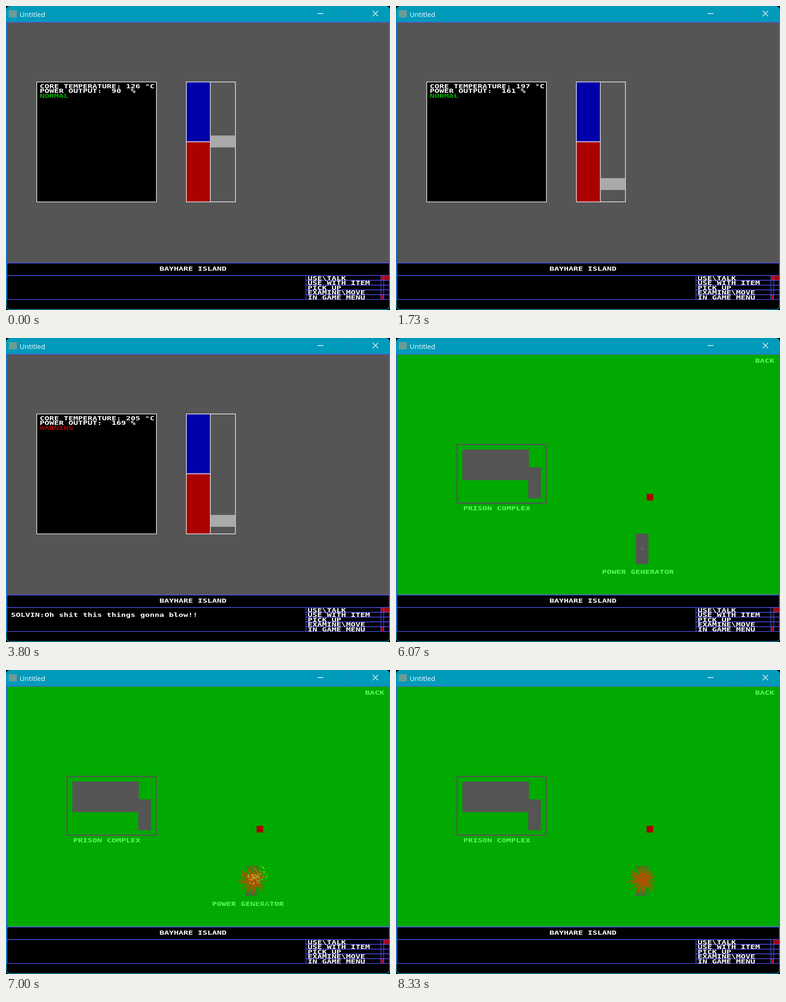
Recreate the animation shown at these times as an HTML page with a canvas. Size 842 px wide and 665 px high, loop 9270 ms.

```html
<!DOCTYPE html>
<html lang="en">
<head>
<meta charset="utf-8">
<title>Untitled</title>
<style>
  html, body { margin: 0; width: 100%; height: 100%; overflow: hidden; background: #000; }
  canvas { display: block; }
</style>
</head>
<body>
<canvas id="stage" width="842" height="665"></canvas>
<script>
const ctx = document.getElementById('stage').getContext('2d');
const LOOP = 9270, TICK = 200 / 3;
const PX = 1.3125;                 // one game pixel on the stage
const GRAY = '#555555', BLUE = '#5555ff', GREEN = '#00aa00', RED = '#aa0000',
      BROWN = '#aa5500', LIME = '#55ff55', YELLOW = '#ffff55', WHITE = '#ffffff',
      TEAL = '#009abb';
const CORE = { x: 540, y: 460.5 };
const MENU = ['USE\\TALK', 'USE WITH ITEM', 'PICK UP', 'EXAMINE\\MOVE', 'IN GAME MENU'];
// [tick, core temperature]
const HEAT = [[0, 126], [3, 126], [18, 174], [27, 200], [30, 202], [31, 202], [33, 205], [139, 205]];

let seed = 7;
const rand = () => (seed = (seed * 16807) % 2147483647) / 2147483647;
const make = (n, f) => Array.from({ length: n }, f);
const ray = (min, max) => ({ angle: rand() * Math.PI * 2, length: min + rand() * (max - min) });

const craters = make(150, () => ray(26, 40));
const flames = make(125, () => ray(13, 34));
const sparks = make(85, () => {
  const speed = 11.3 * rand() ** 1.3;
  return {
    x: (rand() - 0.5) * 24, y: (rand() - 0.5) * 24,
    vx: speed * (0.25 + 0.75 * rand()), vy: -speed * (0.25 + 0.75 * rand()),
    color: rand() < 0.75 ? YELLOW : LIME,
    end: 119 + Math.floor(rand() * 7)
  };
});
const chips = make(26, () => ({ x: 543 + rand() * 33, y: 505 + rand() * 11 }));

function rect(color, x, y, w, h) {
  ctx.fillStyle = color;
  ctx.fillRect(x, y, w, h);
}

function frame(color, x, y, w, h, width = PX) {
  ctx.strokeStyle = color;
  ctx.lineWidth = width;
  ctx.strokeRect(x, y, w, h);
}

function path(color, width, ...points) {
  ctx.strokeStyle = color;
  ctx.lineWidth = width;
  ctx.beginPath();
  for (let i = 0; i < points.length; i += 4) {
    ctx.moveTo(points[i], points[i + 1]);
    ctx.lineTo(points[i + 2], points[i + 3]);
  }
  ctx.stroke();
}

// Wide console lettering: square cells of 8 by 8 game pixels
function print(text, x, baseline, color = WHITE) {
  ctx.save();
  ctx.translate(x, baseline);
  ctx.scale(1.384, 1);
  ctx.font = 'bold 12.6px "DejaVu Sans Mono", monospace';
  ctx.fillStyle = color;
  ctx.fillText(text, 0, 0);
  ctx.restore();
}

function dot(color, x, y) {
  rect(color, Math.round(x / PX) * PX, Math.round(y / PX) * PX, PX, PX);
}

function burst(rays, color, grow) {
  for (const { angle, length } of rays)
    for (let d = 0; d < length * grow; d++)
      dot(color, CORE.x + d * Math.cos(angle), CORE.y + d * Math.sin(angle));
}

function heatAt(k) {
  const i = HEAT.findIndex(([tick]) => tick > k);
  const [k0, v0] = HEAT[i - 1], [k1, v1] = HEAT[i];
  return Math.round(v0 + (v1 - v0) * (k - k0) / (k1 - k0));
}

function drawWindow() {
  ctx.clearRect(0, 0, 842, 665);
  ctx.fillStyle = TEAL;
  ctx.beginPath();
  ctx.roundRect(0, 0, 842, 665, 9);
  ctx.fill();
  ctx.fillStyle = '#000';
  ctx.beginPath();
  ctx.roundRect(1.5, 35, 839, 628.5, [0, 0, 8, 8]);
  ctx.fill();

  rect('#6b9c94', 6, 9, 18, 16);
  ctx.font = '15px "Open Sans", sans-serif';
  ctx.fillStyle = WHITE;
  ctx.fillText('Untitled', 30, 24);
  path(WHITE, 1.3, 683, 16.5, 696, 16.5, 804, 10.5, 816, 22.5, 816, 10.5, 804, 22.5);
  frame('#1987bb', 743.5, 10.5, 11.5, 11.5, 1);
}

function drawStatus(onMap) {
  frame(BLUE, 2.2, 562.2, 838.3, 27.3);
  frame(BLUE, 2.2, 589.5, 838.3, 52.5);
  rect(RED, onMap ? 829 : 822, 590, onMap ? 11 : 18, 10);
  rect(RED, 822, 632, 6, 10);
  for (let i = 1; i < 5; i++) path(BLUE, PX, 658, 589.5 + i * 10.5, 840, 589.5 + i * 10.5);
  for (const x of [657.8, 822, 828.3]) path(BLUE, PX, x, 589.5, x, 642);
  MENU.forEach((label, i) => print(label, 661.5, 599.5 + i * 10.5));
  print('BAYHARE ISLAND', 336.5, 578.5);
}

function drawReactor(k) {
  const heat = heatAt(k);
  rect(GRAY, 2, 35, 838.5, 527);
  rect('#000', 67.5, 166, 262, 262.5);
  frame(WHITE, 67.5, 166.2, 262.3, 262.3);
  print(`CORE TEMPERATURE: ${heat} °C`, 74, 179.5);
  print(`POWER OUTPUT:  ${String(heat - 36).padEnd(3)} %`, 74, 190);
  if (heat < 200) print('NORMAL', 74, 200.5, GREEN);
  else if (k < 38 || k >= 51) print('WARNING', 74, 200.5, RED);

  rect('#0000aa', 395.5, 166, 52.5, 131);
  rect(RED, 395.5, 297, 52.5, 131.5);
  frame(WHITE, 395.5, 166.2, 107.6, 262.3);
  path(WHITE, PX, 448, 166, 448, 428.5, 395.5, 297, 448, 297);
  rect('#aaaaaa', 448.7, 283.3 + (heat - 126) * PX, 53.8, 26);
  if (k >= 57) print('SOLVIN:Oh shit this things gonna blow!!', 11, 609.8);
}

function drawMap(k) {
  rect(GREEN, 2, 35, 838.5, 527);
  print('BACK', 787.5, 53.5, LIME);
  frame(GRAY, 134, 233, 195, 128.5, 2.6);
  rect(GRAY, 145.5, 244, 146, 67);
  rect(GRAY, 290, 283, 27.7, 67.5);
  print('PRISON COMPLEX', 147.5, 376.5, LIME);
  rect(RED, 549.5, 341, 14.5, 14.5);
  rect(GRAY, 526, 428, 27.5, 66.5);
  if (k < 122) print('POWER GENERATOR', 451.8, 515.5, LIME);

  const grow = Math.min(1, (k - 91) / 13);
  burst(craters, GREEN, grow);
  burst(flames, BROWN, grow);
  if (k === 91) dot(WHITE, 539.5, 460.5);
  if (k >= 103 && k < 122) for (const c of chips) dot(GREEN, c.x, c.y);
  if (k >= 102) {
    const age = Math.min(k, 118) - 102;
    for (const s of sparks)
      if (k < s.end) dot(s.color, CORE.x + s.x + s.vx * age, CORE.y + s.y + s.vy * age);
  }
}

let shown = -1;
function tick(now) {
  const k = Math.min(138, Math.floor((now % LOOP + 5) / TICK));
  if (k !== shown) {
    shown = k;
    const onMap = k >= 91;
    drawWindow();
    (onMap ? drawMap : drawReactor)(k);
    frame(BLUE, 2.2, 35.5, 838.3, 526.7);
    drawStatus(onMap);
  }
  requestAnimationFrame(tick);
}
requestAnimationFrame(tick);
</script>
</body>
</html>
```
